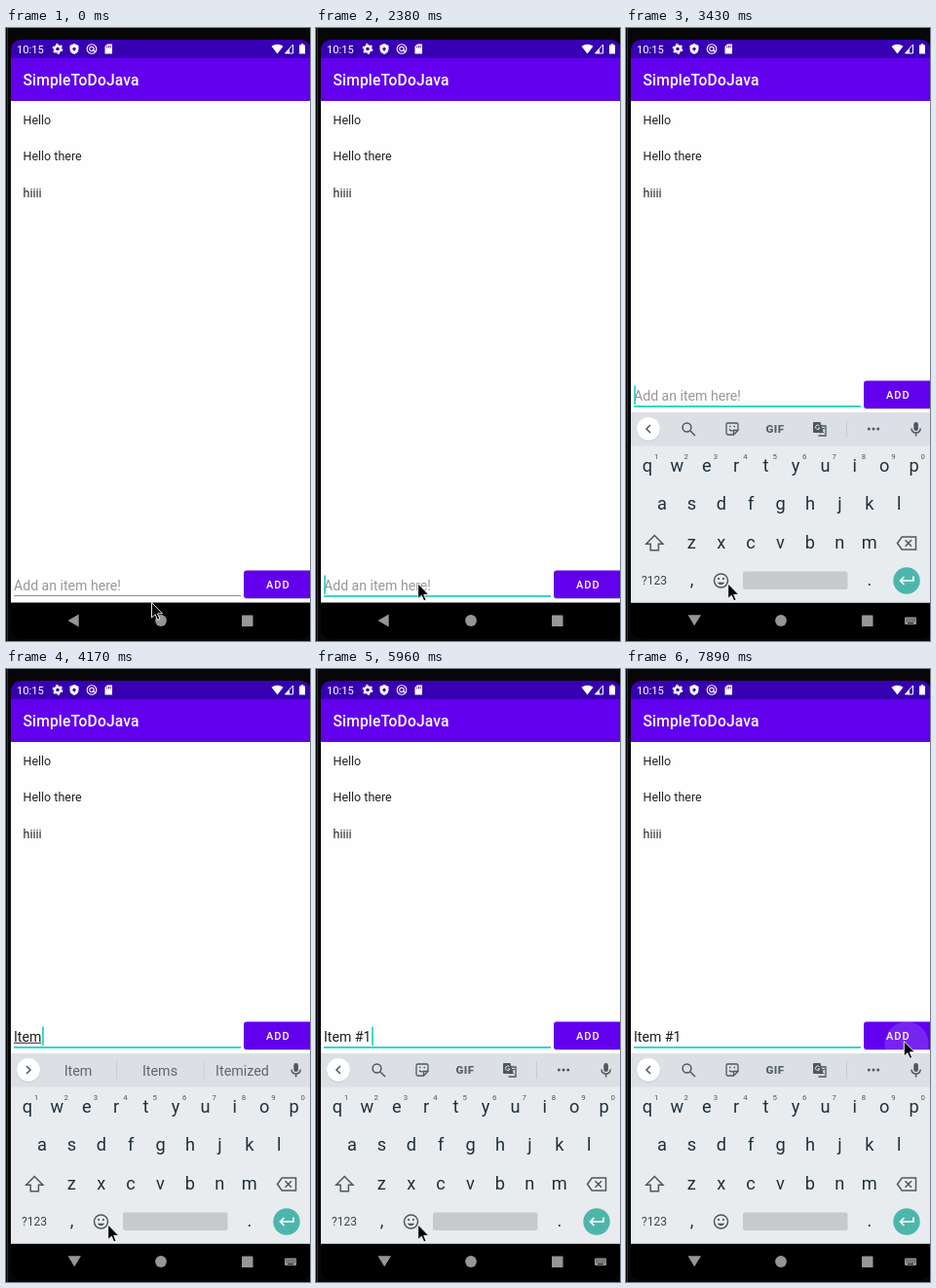
Write an HTML page that moves like this. It is 312 px wide and 630 px high and loops after 8 s.

```html
<!DOCTYPE html>
<html lang="en">
<head>
<meta charset="utf-8">
<title>To-do app</title>
<style>
  html, body { margin: 0; width: 100%; height: 100%; overflow: hidden; background: #070707; }
  svg { display: block; width: 312px; height: 630px; }
  text { font-family: Roboto, sans-serif; white-space: pre; }
  .mid { text-anchor: middle; }
  .list { font-size: 12.5px; fill: #222; }
  .field { font-size: 14.1px; }
  .key { font-size: 18.2px; fill: #20303a; text-anchor: middle; }
  .sup { font-size: 7.8px; fill: #4c575d; text-anchor: middle; }
  .sug { font-size: 14.3px; fill: #5d676d; text-anchor: middle; }
  .line { fill: none; stroke: #4d585e; stroke-width: 1.5; }
</style>
</head>
<body>
<svg viewBox="0 0 312 630">
  <defs>
    <clipPath id="screen"><path d="M5 24Q5 12 17 12H301Q312 12 314 24V616Q312 628 301 628H17Q5 628 5 616Z"/></clipPath>
    <clipPath id="button"><rect x="244" y="557.5" width="72" height="28.5" rx="3"/></clipPath>
  </defs>
  <rect width="312" height="630" fill="#070707"/>
  <rect x="1" width="1" height="630" fill="#303030"/>

  <g clip-path="url(#screen)">
    <rect y="12" width="312" height="618" fill="#000"/>
    <rect y="12" width="312" height="20" fill="#3700b3"/>
    <rect y="31" width="312" height="44" fill="#6200ee"/>
    <rect y="75" width="312" height="515.5" fill="#fefefe"/>

    <!-- status bar -->
    <g fill="#fff">
      <text x="11" y="25.6" font-size="11.2">10:15</text>
      <circle cx="53" cy="21.5" r="3" fill="none" stroke="#fff" stroke-width="2.4"/>
      <circle cx="53" cy="21.5" r="4.7" fill="none" stroke="#fff" stroke-width="1.4" stroke-dasharray="2.4 2.52"/>
      <path d="M70 16L74.5 18V21.5Q74.5 25.5 70 27Q65.5 25.5 65.5 21.5V18Z"/>
      <path d="M70 19.5L72 21.3L70 24L68 21.3Z" fill="#3700b3"/>
      <g fill="none" stroke="#fff" stroke-width="1.1">
        <circle cx="88" cy="21.5" r="4.8"/>
        <circle cx="88" cy="21.5" r="2.2"/>
        <path d="M89 22L92 25"/>
      </g>
      <path d="M104 16.5H109V26.5H101.500V19Z"/>
      <path d="M103.700 18.500V20.500M105.500 18V20.500M107.300 18V20.500" stroke="#3700b3" stroke-width=".8"/>
      <path d="M272.500 18.800Q278.500 14.500 284.500 18.800L278.500 26.500Z"/>
      <path d="M294.500 17V26H286.500Z" fill="none" stroke="#fff"/>
      <path d="M291 21.500V26H286.500Z"/>
      <path d="M301 17.500H302.700V16.300H305.300V17.500H307V26.500H301Z"/>
    </g>
    <text x="17.500" y="59.300" font-size="15.6" font-weight="500" letter-spacing=".15" fill="#fff">SimpleToDoJava</text>

    <text class="list" x="17.500" y="98.500">Hello</text>
    <text class="list" x="17.500" y="136.200">Hello there</text>
    <text class="list" x="17.500" y="173.900">hiiii</text>

    <!-- input row -->
    <g id="row">
      <text id="hint" class="field" x="8" y="578" fill="#979797">Add an item here!</text>
      <text id="typed" class="field" x="8" y="578" fill="#1c1c1c"></text>
      <rect id="mark" x="8" y="578.800" height="1" fill="#222"/>
      <rect id="rule" x="8" width="233"/>
      <rect id="caret" y="562.500" width="1.500" height="19.500" fill="#03cdb9"/>
      <rect x="244" y="558.500" width="72" height="28.500" rx="3" fill="#000" opacity=".2"/>
      <g clip-path="url(#button)">
        <rect x="244" y="557" width="72" height="30" fill="#6200ee"/>
        <circle id="ripple" cx="288" cy="580" r="22.500" fill="#fff" opacity=".14"/>
      </g>
      <text x="267" y="576" font-size="11" font-weight="500" letter-spacing="1" fill="#fff">ADD</text>
    </g>

    <!-- navigation bar -->
    <g fill="#969696">
      <path id="back"/>
      <circle cx="159" cy="609" r="5.900"/>
      <rect x="242" y="603.500" width="11.500" height="11.500" rx=".6"/>
      <g id="switcher">
        <rect x="286" y="605.500" width="12" height="7.500" rx="1"/>
        <path d="M287.500 607.500H297M287.500 609.500H297" stroke="#000" stroke-width=".8" stroke-dasharray="1 1.100"/>
        <path d="M289 611.600H295" stroke="#000" stroke-width=".9"/>
      </g>
    </g>

    <!-- keyboard -->
    <g id="board">
      <rect y="395" width="312" height="195.500" fill="#e8ecef"/>
      <rect y="395" width="312" height="34.500" fill="#dce0e4"/>
      <circle cx="23" cy="412.700" r="12.200" fill="#000" opacity=".12"/>
      <circle cx="23" cy="412" r="11.900" fill="#fff"/>
      <path id="chevron" class="line" d="M25 408L21 412L25 416"/>
      <g id="tools">
        <g class="line">
          <circle cx="62.500" cy="410.500" r="4.400"/>
          <path d="M66 414L71 419"/>
          <path d="M104.500 406H113.500Q115 406 115 407.500V413.500L110.500 418H104.500Q103 418 103 416.500V407.500Q103 406 104.500 406ZM110.500 418V413.500H115M106 412.500Q107.500 414.500 110 413.500" stroke-width="1.300"/>
          <path d="M106 409.500H107.500M110.500 409.500H112"/>
          <path d="M200 409H205V419H197.500" stroke-width="1.300"/>
          <path d="M199.500 411.500H204M202 411V412.500Q202 415 199.500 416.500M200.500 413.500L203.500 416.500" stroke-width="1"/>
        </g>
        <path d="M193 405H199.500L202.500 416H193Q192 416 192 415V406Q192 405 193 405Z" fill="#4d585e"/>
        <path d="M198.500 408.700A2.300 2.300 0 1 0 199 411H196.800" fill="none" stroke="#dce0e4"/>
        <text class="mid" x="153" y="416" font-size="11.500" font-weight="800" letter-spacing=".5" fill="#566168">GIF</text>
        <rect x="226" y="403" width="1" height="18" fill="#c8cdd1"/>
        <g fill="#4d585e">
          <circle cx="249.300" cy="412" r="1.500"/><circle cx="254" cy="412" r="1.500"/><circle cx="258.700" cy="412" r="1.500"/>
        </g>
      </g>
      <g id="suggest">
        <rect x="113" y="403" width="1" height="18" fill="#c8cdd1"/>
        <rect x="202.500" y="403" width="1" height="18" fill="#c8cdd1"/>
        <text class="sug" x="74" y="417.500"></text>
        <text class="sug" x="158" y="417.500"></text>
        <text class="sug" x="242.500" y="417.500"></text>
      </g>
      <rect x="295.300" y="405" width="4.600" height="9" rx="2.300" fill="#4d585e"/>
      <path class="line" d="M293 411.500Q293.300 416 297.600 416Q301.900 416 302.200 411.500M297.600 416V419.500" stroke-width="1.300"/>

      <g id="keys"></g>
      <g class="line">
        <path d="M29.300 521.500L20.700 530.300H25.200V536.800H33.400V530.300H37.900Z"/>
        <path d="M278.500 529.500L283.200 523H297.500V536H283.200ZM286.500 526.300L293 532.800M293 526.300L286.500 532.800"/>
        <circle cx="97.500" cy="568" r="7"/>
        <path d="M93.700 569.700Q97.500 575 101.300 569.700Z" fill="#4d585e" stroke="none"/>
        <path d="M94.200 566H96M99 566H100.800" stroke-width="1.800"/>
      </g>
      <text class="mid" x="29" y="572.300" font-size="12" fill="#37444b">?123</text>
      <rect x="120" y="558.500" width="107.500" height="18.500" rx="2" fill="#c6cacd"/>
      <circle cx="288" cy="568" r="13.700" fill="#4db6ac"/>
      <path d="M295 563.500V568H281.500M285.500 564L281.500 568L285.500 572" fill="none" stroke="#fff" stroke-width="1.700"/>
    </g>
  </g>

  <path id="pointer" d="M0 0V15.500L3.600 12.200L6 17.800L8.400 16.800L6 11.300H11Z" fill="#000" stroke="#fff" stroke-width=".9"/>
</svg>
<script>
const $ = id => document.getElementById(id);
const set = (id, attrs) => { for (const k in attrs) $(id).setAttribute(k, attrs[k]); };
const show = (id, on) => set(id, { visibility: on ? "visible" : "hidden" });

// Each entry holds its values from its start time on.
const at = (steps, t) => steps.filter(s => s[0] <= t).pop();

const pointer = [
  [0, 149.5, 590.5], [140, 142, 580], [290, 136, 572], [440, 133, 569],
  [1040, 130, 569], [1190, 121, 570], [1340, 112, 571], [1480, 107, 571], [1630, 104.7, 571],
  [6710, 112, 561], [6860, 142, 523], [7010, 192, 468], [7150, 244, 418],
  [7300, 280, 389], [7450, 290, 381], [7590, 285.3, 382.5]
];
const typing = [
  [0, ""], [3570, "I", "I", "I'm", "It"], [3870, "It", "It", "It's", "Its"],
  [4020, "Ite", "Item", "Items", "Iteration"], [4170, "Item", "Item", "Items", "Itemized"],
  [5070, "Item ", "is", "in", "and"], [5670, "Item #"], [5960, "Item #1"]
];
const blink = [
  [0, false], [2380, true], [2830, false], [3430, true], [4620, false], [5070, true],
  [5520, false], [5670, true], [6410, false], [6860, true], [7450, false]
];
const slide = [[0, 0, 0], [2530, 6.5, .865], [2680, 1, .97], [2830, 0, 1]];

const label = (cls, x, y, s) => `<text class="${cls}" x="${x}" y="${y}">${s}</text>`;
const keyRow = (letters, x, y) => [...letters].map((c, i) => label("key", x + i * 30.4, y, c)).join("");
$("keys").innerHTML =
  keyRow("qwertyuiop", 22, 455.5) + keyRow("asdfghjkl", 37, 495) + keyRow("zxcvbnm", 67.3, 534.5) +
  [..."1234567890"].map((c, i) => label("sup", 31.2 + i * 30.4, 443, c)).join("") +
  label("key", 67.5, 573, ",") + label("key", 250, 573, ".");

function draw(t) {
  const [, px, py] = at(pointer, t);
  const [, text, ...words] = at(typing, t);
  const [, drop, alpha] = at(slide, t);
  const focused = t >= 2380, open = t >= 2530, suggesting = words.length > 0;

  set("pointer", { transform: `translate(${px} ${py})` });
  set("row", { transform: `translate(0 ${open ? -195 : 0})` });
  set("board", { transform: `translate(0 ${drop})`, opacity: alpha });
  set("rule", focused ? { y: 583, height: 1.8, fill: "#1fd4c2" } : { y: 583, height: 1, fill: "#8f8f8f" });
  set("back", { d: open ? "M63.500 603.300H77L70.200 614.300Z" : "M63.500 609L74.700 602.500V615.500Z" });
  show("switcher", open);

  $("typed").textContent = text;
  const width = text ? $("typed").getComputedTextLength() : 0;
  show("hint", !text);
  set("mark", { width: suggesting && !text.endsWith(" ") ? width : 0 });
  set("caret", { x: 8.3 + width + (text ? .6 : 0) });
  show("caret", at(blink, t)[1]);

  show("tools", !suggesting);
  show("suggest", suggesting);
  document.querySelectorAll(".sug").forEach((el, i) => el.textContent = words[i] || "");
  const turn = suggesting ? 180 : t >= 5670 && t < 5820 ? 60 : 0;
  set("chevron", { transform: `rotate(${turn} 23 412)` });
  show("ripple", t >= 7890);
}

function tick() {
  draw(performance.now() % 8000);
  requestAnimationFrame(tick);
}
tick();
</script>
</body>
</html>
```
